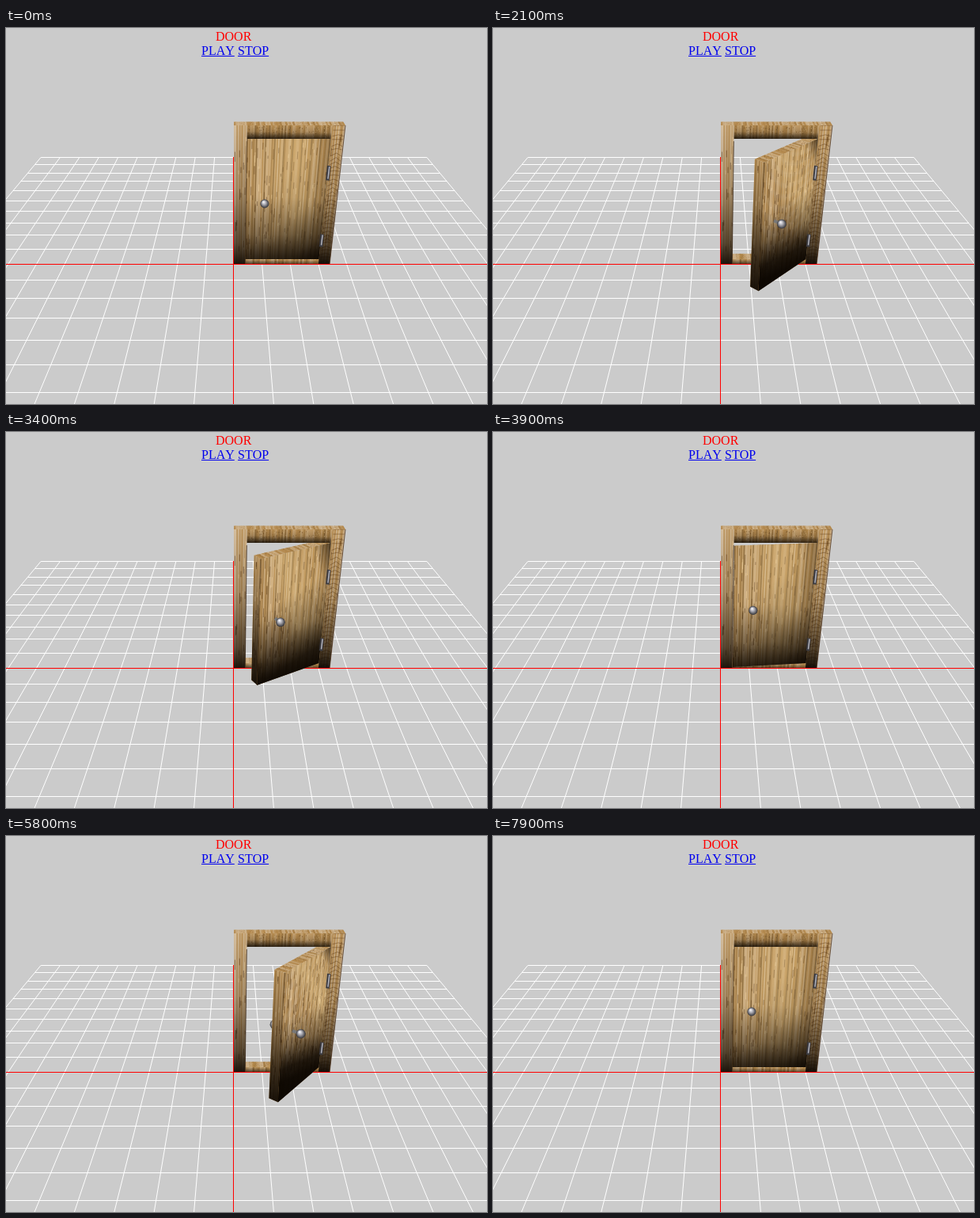
These frames come from a looping animation (608 px wide and 475 px high, 9900 ms). An HTML page with a canvas:

```html
<!DOCTYPE html>
<html lang="en">
<head>
<meta charset="utf-8">
<title>Door</title>
<style>
html, body { margin: 0; width: 100%; height: 100%; overflow: hidden; background: #cbcbcb; }
canvas { position: absolute; left: 0; top: 0; }
span { position: absolute; font: 16px/18px "Liberation Serif", serif; font-kerning: none; color: #f00; }
.link { color: #00e; text-decoration: underline; top: 20px; }
.link.on { color: #f00; }
#play { left: 247px; }
#stop { left: 293px; }
</style>
</head>
<body>
<canvas id="stage" width="608" height="475"></canvas>
<span style="left:265px;top:2px">DOOR</span>
<span class="link" id="play">PLAY</span>
<span class="link" id="stop">STOP</span>
<script>
const LOOP = 9900, STEP = 100;
const DEPTH = 0.35, SILL = 0.04, LINTEL = 0.911, TOP = 0.995, POST = 0.4, HINGE = 3, WIDTH = 3.4;
const DARK = '10,5,0', GLOW = '255,226,165';
const play = document.getElementById('play'), stop = document.getElementById('stop');
const c = document.getElementById('stage').getContext('2d');

// X right and Z towards the viewer in grid cells, Y up in frame heights
function project(X, Y, Z) {
  const w = 21.712 - 3.077 * Y - Z;
  return [288 + 773.4 * X / w, (6469.8 - 4196 * Y + 128.84 * Z) / w, w];
}

const lerp = (a, b, k) => a + (b - a) * k;
const rnd = s => { const v = Math.sin(s * 127.1 + 3.7) * 43758.5453; return v - Math.floor(v); };

function path(points) {
  c.beginPath();
  points.forEach(p => c.lineTo(p[0], p[1]));
}

function line(color, width, ...points) {
  path(points);
  c.strokeStyle = color;
  c.lineWidth = width;
  c.stroke();
}

function shade(at, from, to, stops, color = DARK) {
  const a = at(...from), b = at(...to);
  const g = c.createLinearGradient(a[0], a[1], b[0], b[1]);
  stops.forEach(([k, alpha]) => g.addColorStop(k, `rgba(${color},${alpha})`));
  path([at(0, 0), at(1, 0), at(1, 1), at(0, 1)]);
  c.fillStyle = g;
  c.fill();
}

// Wooden face: at(u, v) gives the screen point, the grain runs along v
function board(at, n, seed, light, plank = 0) {
  for (let i = 0; i < n; i++) {
    const u = i / n, r = Math.min(1, (i + 1.4) / n);
    const seam = plank && i % plank === 0;
    const l = seam ? light - 16 : light + 22 * (rnd(seed + i) - 0.5);
    path([at(u, 0), at(r, 0), at(r, 1), at(u, 1)]);
    c.fillStyle = `hsl(35,40%,${l}%)`;
    c.fill();
  }
  for (let i = 0; i < n * 2; i++) {
    const u = rnd(seed + i * 1.37), v = rnd(seed + i * 2.11) * 0.92;
    const end = v + 0.02 + 0.06 * rnd(seed + i * 3.3);
    const color = i % 3 ? 'rgba(75,42,12,.5)' : 'rgba(250,222,170,.5)';
    line(color, 0.9, at(u, v), at(u, end));
  }
}

const front = (x0, x1, y0, y1) => (u, v) => project(lerp(x0, x1, u), lerp(y1, y0, v), 0);
const flat = (x0, x1, y) => (u, v) => project(lerp(x0, x1, u), y, lerp(-DEPTH, 0, v));

function ground() {
  c.fillStyle = '#cbcbcb';
  c.fillRect(0, 0, 608, 475);
  for (let k = -10; k <= 10; k++) {
    if (!k) continue;
    const a = project(-10, 0, k), b = project(10, 0, k);
    a[1] = b[1] = Math.floor(a[1]) + 0.5;
    line('#fff', 1, a, b);
    line('#fff', 1, project(k, 0, -10), project(k, 0, 10));
  }
  line('#f00', 1, [0, 298.5], [608, 298.5]);
  line('#f00', 1, [287.5, 163], [287.5, 475]);
}

function frame() {
  const sill = front(POST, HINGE, 0, SILL), sillTop = flat(POST, HINGE, SILL);
  board(sillTop, 40, 11, 56);
  board(sill, 40, 17, 54);
  shade(sill, [0, 0], [0, 1], [[0, 0], [1, 0.65]]);

  const beam = front(POST, HINGE, LINTEL, TOP);
  board(beam, 54, 23, 52);
  shade(beam, [0, 0], [0, 1], [[0, 0], [0.45, 0.15], [1, 0.85]]);

  const left = front(0, POST, 0, TOP);
  board(left, 10, 31, 63);
  shade(left, [0, 0], [0, 1], [[0, 0], [0.45, 0.18], [0.85, 0.6], [1, 0.9]]);
  line('rgba(40,22,6,.7)', 1, left(1, 0.1), left(1, 1));

  const right = front(HINGE, WIDTH, 0, TOP);
  board(right, 10, 43, 60);
  for (let i = 0; i < 34; i++) {
    const v = i / 34, d = 0.025 * rnd(i + 5);
    line('rgba(80,45,14,.4)', 1, right(0.1, v + d), right(0.55, v), right(0.95, v + d));
  }
  shade(right, [0, 0], [0, 1], [[0, 0], [0.5, 0.15], [0.85, 0.6], [1, 0.95]]);
  line('rgba(60,32,8,.7)', 1, right(1, 0), right(1, 1));

  board(flat(0, WIDTH, TOP), 60, 59, 58);
}

function knob(at, side) {
  const root = side > 0 ? 0 : -DEPTH;
  const base = at(2, 0.5, root), p = at(2, 0.5, root + side * 0.3);
  line('#777', 4, base, p);
  const r = 110 / p[2];
  const g = c.createRadialGradient(p[0] - r * 0.25, p[1] - r * 0.4, 0.5, p[0], p[1], r);
  g.addColorStop(0, '#f4f4f8');
  g.addColorStop(0.45, '#a2a2aa');
  g.addColorStop(1, '#303034');
  c.beginPath();
  c.arc(p[0], p[1], r, 0, 7);
  c.fillStyle = g;
  c.fill();
}

function door(degrees) {
  const turn = degrees * Math.PI / 180, sin = Math.sin(turn), cos = Math.cos(turn);
  const span = HINGE - POST, open = Math.min(1, degrees / 30);
  // r: distance from the hinge, out: distance in front of the leaf
  const at = (r, Y, out) => project(HINGE - r * cos + out * sin, Y, r * sin + out * cos);
  const leaf = (u, v) => at(span * (1 - u), lerp(LINTEL, SILL, v), 0);
  const edge = (u, v) => at(span, lerp(LINTEL, SILL, v), -DEPTH * (1 - u));
  const top = (u, v) => at(span * (1 - u), LINTEL, -DEPTH * (1 - v));

  c.save();
  c.beginPath();
  c.rect(0, project(0, LINTEL, 0)[1], 608, 475);
  c.clip();
  if (degrees > 8) {
    knob(at, -1);
    board(top, 30, 71, 57);
    board(edge, 9, 83, 54);
    shade(edge, [0, 0], [0, 1], [[0, 0], [0.4, 0.25], [0.8, 0.75], [1, 0.9]]);
    line('rgba(50,28,8,.5)', 1, edge(1, 0), edge(1, 1));
  }
  board(leaf, 64, 97, 55, 7);
  shade(leaf, [0, 0], [1, 0], [[0, 0], [lerp(0.6, 0.3, open), 0.3], [1, 0]], GLOW);
  shade(leaf, [0, 0.45], [0, 1], [[0, 0], [0.6, 0.3], [1, 0.75]]);
  shade(leaf, [0.3, 0.35], [1, 1], [[0, 0], [0.45, 0.12 + 0.23 * open], [0.8, 0.45 + 0.4 * open], [1, 0.85 + 0.1 * open]]);
  shade(leaf, [0.75, 0], [1, 0], [[0, 0], [1, 0.15 + 0.45 * open]]);
  knob(at, 1);
  c.restore();
}

function hinges() {
  for (const y of [0.14, 0.635]) {
    const a = project(HINGE, y, 0), b = project(HINGE, y + 0.1, 0);
    a[0]++;
    b[0]++;
    line('#3a3a40', 4.5, a, b);
    line('#b4b4bc', 1.5, [a[0] + 0.5, a[1] - 2], [b[0] + 0.5, b[1] + 1]);
  }
}

// Opens, is reversed, opens again, is halted, then closes
function angle(t) {
  if (t < 1300) return 0;
  if (t < 2700) return Math.min(70, (t - 1200) * 0.0517);
  if (t < 4700) return Math.max(0, 56.4 - (t - 2900) * 0.0508);
  if (t < 6900) return Math.min(52.3, (t - 4700) * 0.052);
  return Math.max(0, 32.9 - (t - 7200) * 0.0508);
}

let shown = -1;
function tick(now) {
  const t = Math.floor(now % LOOP / STEP) * STEP;
  if (t !== shown) {
    shown = t;
    ground();
    frame();
    door(angle(t));
    hinges();
    play.classList.toggle('on', [2600, 4700, 6800].includes(t));
    stop.classList.toggle('on', t === 5700);
  }
  requestAnimationFrame(tick);
}
tick(performance.now());
</script>
</body>
</html>
```
